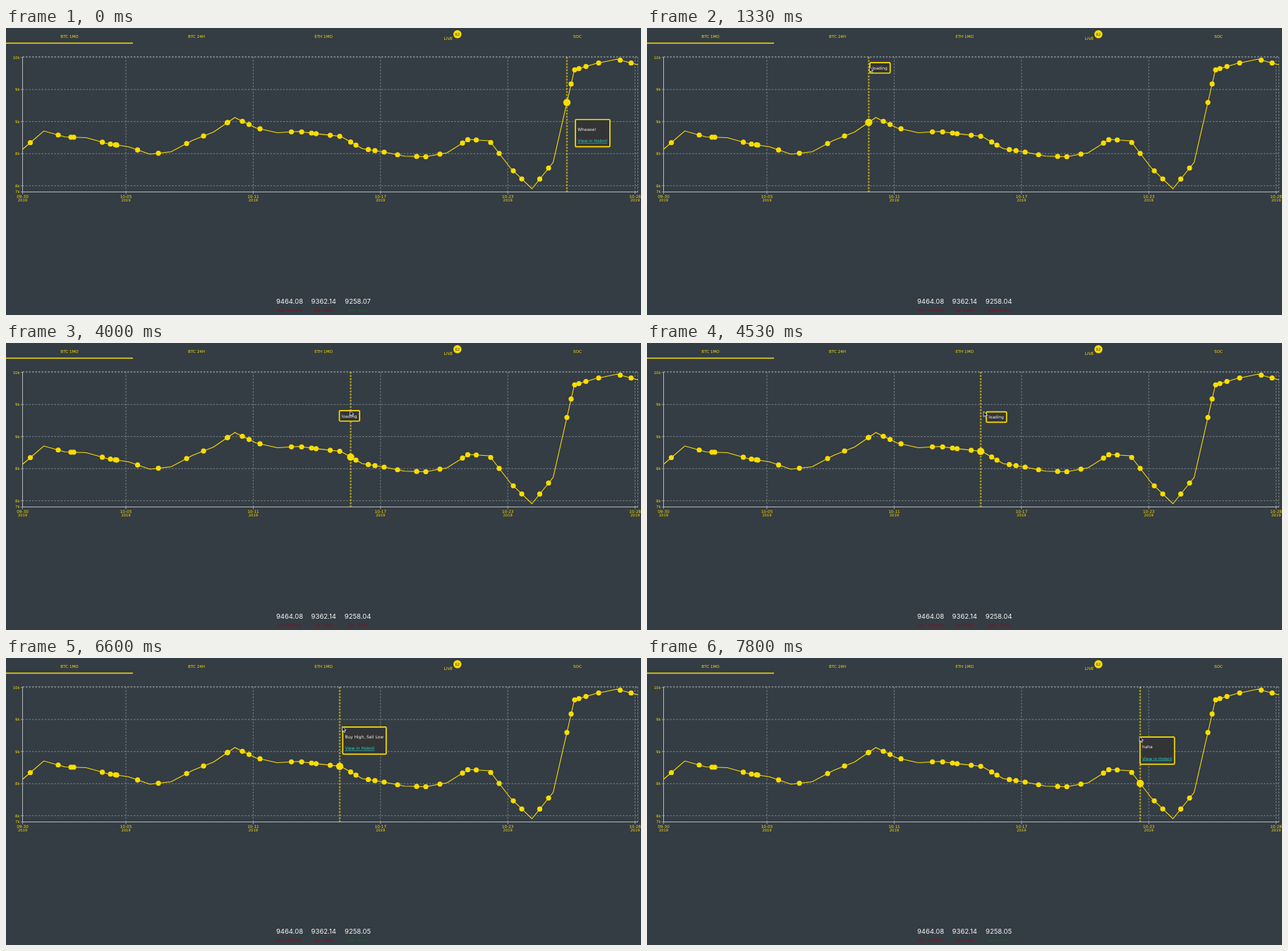
Animation of 900 by 407 pixels, one loop 8000 ms. Source, as an HTML page with a canvas:

```html
<!DOCTYPE html>
<html lang="en">
<head>
<meta charset="utf-8">
<title>Price chart</title>
<style>
html, body { margin: 0; width: 100%; height: 100%; overflow: hidden; background: #343c44; }
canvas { display: block; }
</style>
</head>
<body>
<canvas width="900" height="407"></canvas>
<script>
const ctx = document.querySelector('canvas').getContext('2d');
const LOOP = 8000, BACK = '#343c44', YELLOW = '#f9dd00', GRID = '#8f969a', AXIS = '#b4b9bc';
const RED = '#a3000f', GREEN = '#13701c', CYAN = '#22d6cb', LINK = 'View in Hobnil';
const LEFT = 23.5, RIGHT = 896, TOP = 41, BOTTOM = 232.5, DAY = 30.08;
const BOX_LAG = 75, GROW_DELAY = 35;

// One height per day; posts sit on the line at their own times
const daily = [172, 146, 154.5, 155.5, 164, 168.5, 179, 175.5, 159.5, 147.5, 127, 141.7, 148.5, 146.8, 150.4,
  153.8, 171, 175.8, 181.7, 182.5, 177, 158, 160, 199, 228, 190.5, 59.5, 50.5, 44.3, 52.3];
const postX = [34.5, 74, 92, 96, 136.5, 148, 155, 157, 186.5, 216, 256, 280, 313.5, 314.3, 335, 344.5, 360,
  404.5, 419, 433, 439.5, 459.5, 473, 488.5, 496, 513.5, 523, 536, 555, 582, 595, 615, 647, 654.5, 666.5,
  687, 699, 719, 731, 756.5, 769, 795, 801, 806, 812, 822, 840, 870.5, 886];

const priceLine = daily.map((y, i) => [LEFT + DAY * i, y]);
const dots = postX.map(x => [x, heightAt(x)]);

// Pointer moves: start, end, x, y
const moves = [
  [-242, 933, 315, 43], [1070, 1730, 316, 81.5], [3470, 3530, 400, 92], [3620, 4080, 491, 96],
  [4200, 4600, 476.5, 97], [6653, 7217, 690, 126], [7230, 7600, 698, 111.3]
];
const posts = [
  [0, 70, 'Wheeee!'], [2400, 3530, "Jesus people.... it's only 4%"],
  [5270, 6700, 'Buy High, Sell Low'], [7730, LOOP, 'haha']
];

const mix = (a, b, k) => a + (b - a) * k;
const clamp = k => Math.min(1, Math.max(0, k));
const ease = k => k * k * k * (10 - 15 * k + 6 * k * k);

function heightAt(x) {
  const day = (x - LEFT) / DAY, i = Math.floor(day);
  return daily[i] + (daily[i + 1] - daily[i]) * (day - i);
}

function pointer(t) {
  return moves.reduce(([px, py], [start, end, x, y]) => {
    const k = ease(clamp((t - start) / (end - start)));
    return [mix(px, x, k), mix(py, y, k)];
  }, [818, 131]);
}

function nearest(t) {
  const [x] = pointer(t);
  return dots.reduce((a, b) => Math.abs(b[0] - x) < Math.abs(a[0] - x) ? b : a);
}

function text(s, x, y, size, color, align = 'center', family = '"DejaVu Sans"') {
  ctx.font = `${size}px ${family}, sans-serif`;
  ctx.textAlign = align;
  ctx.fillStyle = color;
  ctx.fillText(s, x, y + size * 0.365);
}

function stroke(points, color, width = 1, dash = []) {
  ctx.beginPath();
  points.forEach(p => ctx.lineTo(...p));
  ctx.strokeStyle = color;
  ctx.lineWidth = width;
  ctx.setLineDash(dash);
  ctx.stroke();
  ctx.setLineDash([]);
}

const across = (y, ...style) => stroke([[LEFT, y], [RIGHT, y]], ...style);
const down = (x, ...style) => stroke([[x, TOP], [x, BOTTOM]], ...style);

function disc(x, y, r) {
  ctx.beginPath();
  ctx.arc(x, y, r, 0, 7);
  ctx.fillStyle = YELLOW;
  ctx.fill();
}

function drawTabs() {
  ['BTC 1MO', 'BTC 24H', 'ETH 1MO', '', 'SOC'].forEach((s, i) => text(s, 90 + 180 * i, 11.7, 5.6, YELLOW));
  text('LIVE', 627, 14.5, 5.8, YELLOW);
  disc(639.8, 8.8, 5.8);
  text('62', 639.8, 9, 5.3, BACK);
  stroke([[0, 21.5], [180, 21.5]], YELLOW, 1.4);
}

function drawAxes() {
  const grid = [GRID, 0.8, [2.5, 2]];
  ['10k', '9k', '9k', '8k', '8k', '7k'].forEach((s, i) => {
    const y = Math.min(41.7 + 45.5 * i, BOTTOM);
    if (y < BOTTOM) across(y, ...grid);
    stroke([[LEFT - 2.5, y], [LEFT, y]], AXIS, 0.8);
    text(s, 19.5, y, 5.3, YELLOW, 'right');
  });
  ['09-30', '10-05', '10-11', '10-17', '10-23', '10-28'].forEach((s, i) => {
    const x = i ? 170 + 180.4 * (i - 1) : LEFT;
    if (i) down(x, ...grid);
    stroke([[x, BOTTOM], [x, BOTTOM + 3]], AXIS, 0.8);
    text(s, x, 238.8, 5.7, YELLOW);
    text('2019', x, 244.2, 5.2, YELLOW);
  });
  across(TOP - 0.5, ...grid);
  down(RIGHT - 0.5, ...grid);
  stroke([[LEFT, TOP], [LEFT, BOTTOM], [RIGHT, BOTTOM]], AXIS);
}

function drawSeries(t) {
  const active = nearest(t);
  down(active[0], 'rgba(249,221,0,.6)', 2.4, [2.6, 1.8]);
  stroke(priceLine, YELLOW, 1.1);
  dots.forEach(d => disc(...d, 3.6));
  if (active === nearest(t - GROW_DELAY)) disc(...active, 5.2);
}

function drawPrices(t) {
  const [price, color, start] =
    t < 495 ? ['9258.07', GREEN, -LOOP] :
    t < 5270 ? ['9258.04', RED, 495] : ['9258.05', GREEN, 5270];
  ctx.fillStyle = `rgba(249,221,0,${0.6 * (1 - clamp((t - start) / 700))})`;
  ctx.fillRect(479, 380, 39, 15);
  [['9464.08', 'last: -0.0010%', RED], ['9362.14', 'low: -0.02%', RED],
    [price, color === RED ? 'open: -0.03%' : 'open: 0.01%', color]].forEach(([value, note, tint], i) => {
    const x = 402 + 48.3 * i;
    text(value, x, 387.5, 9.5, '#f4f4f4', 'center', 'Inter');
    text(note, x, 399.8, 4.7, tint);
  });
}

function drawTooltip(t) {
  const [x, y] = pointer(t - BOX_LAG);
  const post = posts.find(([start, end]) => t >= start && t < end);
  const rows = post ? [post[2], LINK] : ['loading'];
  ctx.font = '5.9px "DejaVu Sans", sans-serif';
  const w = Math.max(...rows.map(s => ctx.measureText(s).width)) + 8;
  ctx.beginPath();
  ctx.roundRect(x + 0.8, y + 0.8, w - 1, post ? 38.6 : 14.8, 1.2);
  ctx.fillStyle = '#333435';
  ctx.fill();
  ctx.strokeStyle = YELLOW;
  ctx.lineWidth = 1.7;
  ctx.stroke();
  text(rows[0], x + 4, y + (post ? 15 : 8.2), 5.9, '#f0f0f0', 'left');
  if (!post) return;
  text(LINK, x + 4, y + 31.3, 5.9, CYAN, 'left');
  const end = x + 4 + ctx.measureText(LINK).width;
  stroke([[x + 4, y + 34.4], [end, y + 34.4]], CYAN, 0.6);
}

function drawPointer(t) {
  if (t < 70) return;
  ctx.save();
  ctx.translate(...pointer(t));
  ctx.beginPath();
  [[0, 0], [0, 7.5], [1.8, 6], [3, 8.6], [4.3, 8], [3.1, 5.5], [5.5, 5.4]].forEach(p => ctx.lineTo(...p));
  ctx.closePath();
  ctx.fillStyle = '#15181b';
  ctx.fill();
  ctx.strokeStyle = '#e8e8e8';
  ctx.lineWidth = 0.8;
  ctx.stroke();
  ctx.restore();
}

const begin = performance.now();
function tick() {
  const t = (performance.now() - begin) % LOOP;
  ctx.fillStyle = BACK;
  ctx.fillRect(0, 0, 900, 407);
  drawTabs();
  drawAxes();
  drawSeries(t);
  drawPrices(t);
  drawTooltip(t);
  drawPointer(t);
  requestAnimationFrame(tick);
}
tick();
</script>
</body>
</html>
```
